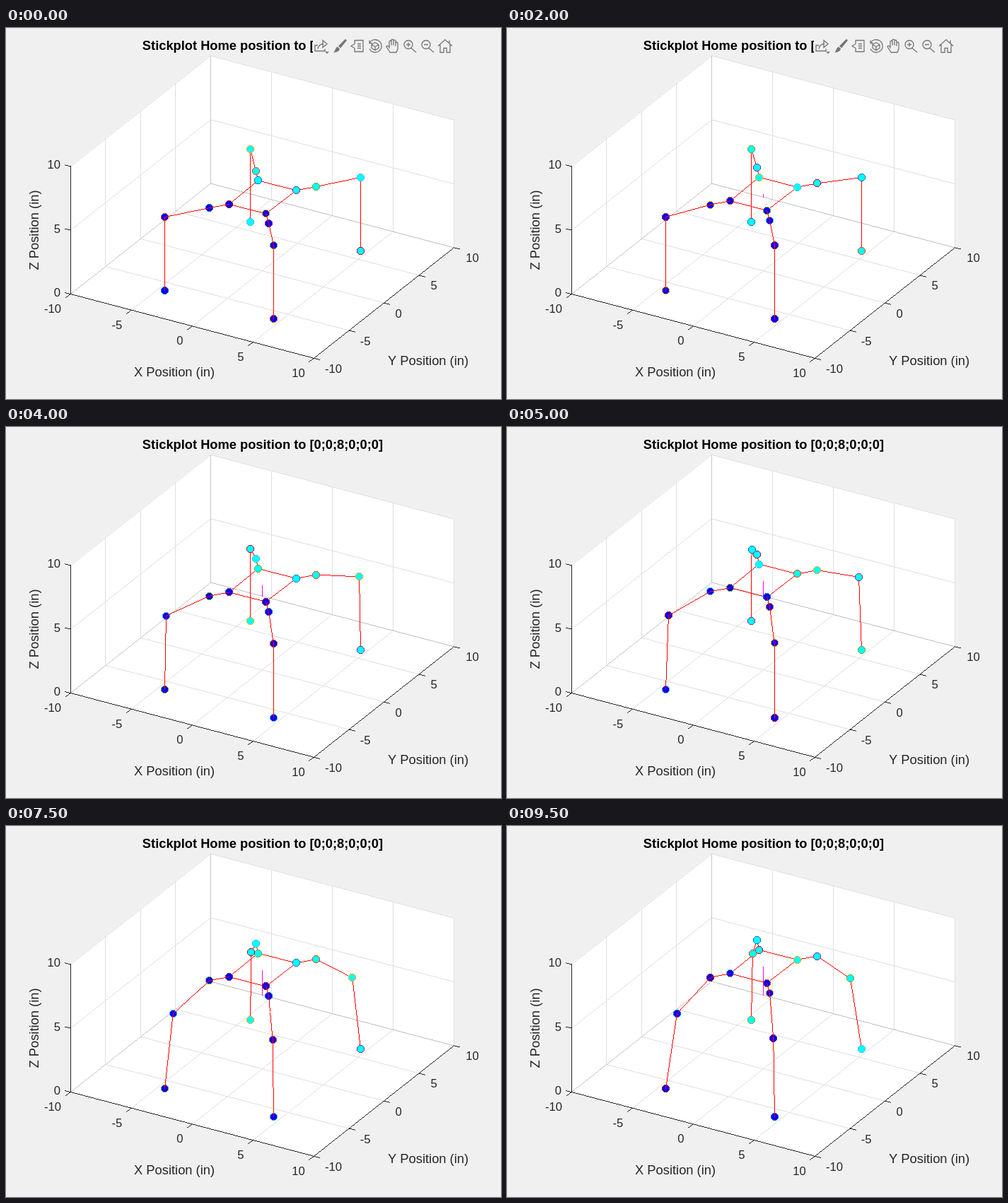
Recreate the animation shown at these times as an HTML page with a canvas. Size 700x525 px, loop 10000 ms.

```html
<!DOCTYPE html>
<html lang="en">
<head>
<meta charset="utf-8">
<title>Stickplot</title>
<style>
html, body { margin: 0; width: 100%; height: 100%; overflow: hidden; background: #f0f0f0; }
canvas { display: block; }
</style>
</head>
<body>
<canvas id="stage" width="700" height="525"></canvas>
<script>
const ctx = document.getElementById('stage').getContext('2d');
const FONT = '"Liberation Sans", Arial, sans-serif';
const STEP = 500, STEPS = 20;
const EDGES = ['#0072bd', '#d95319', '#edb120', '#7e2f8e', '#77ac30', '#4dbeee', '#a2142f'];

// Axes projection: pixels per inch along x, y and z
const project = (x, y, z) => [
  91 + (x + 10) * 17.22 + (y + 10) * 9.89,
  376 + (x + 10) * 4.54 - (y + 10) * 7.82 - z * 18.07
];

// Hard-edged one pixel line
function line([x, y], [x2, y2], color) {
  const n = Math.max(1, Math.round(Math.max(Math.abs(x2 - x), Math.abs(y2 - y))));
  const dx = (x2 - x) / n, dy = (y2 - y) / n;
  ctx.fillStyle = color;
  for (let i = 0; i <= n; i++) {
    ctx.fillRect(Math.round(x + dx * i), Math.round(y + dy * i), 1, 1);
  }
}

// Hard-edged disc, 11 pixels wide with a one pixel rim
function marker(x, y, fill, edge) {
  for (let j = -5; j <= 5; j++) {
    for (let i = -5; i <= 5; i++) {
      const d = Math.hypot(i, j);
      if (d >= 5.4) continue;
      ctx.fillStyle = d > 4.5 ? edge : fill;
      ctx.fillRect(x + i, y + j, 1, 1);
    }
  }
}

function text(s, x, y, size = 16.67, align = 'left', color = '#262626', weight = '') {
  ctx.font = `${weight} ${size}px ${FONT}`;
  ctx.textAlign = align;
  ctx.fillStyle = color;
  ctx.fillText(s, x, y);
}

function drawAxes() {
  ctx.fillStyle = '#f0f0f0';
  ctx.fillRect(0, 0, 700, 525);
  const outline = [[-10, -10, 10], [-10, 10, 10], [10, 10, 10], [10, 10, 0], [10, -10, 0], [-10, -10, 0]];
  ctx.fillStyle = '#fff';
  ctx.beginPath();
  outline.forEach(p => ctx.lineTo(...project(...p)));
  ctx.fill();

  const grid = (a, b, color = '#dfdfdf') => line(project(...a), project(...b), color);
  for (let v = -10; v <= 10; v += 5) {
    grid([v, -10, 0], [v, 10, 0]);
    grid([v, 10, 0], [v, 10, 10]);
    grid([-10, v, 0], [10, v, 0]);
    grid([-10, v, 0], [-10, v, 10]);
  }
  for (let z = 5; z <= 10; z += 5) {
    grid([-10, -10, z], [-10, 10, z]);
    grid([-10, 10, z], [10, 10, z]);
  }
  grid([-10, 10, 0], [-10, 10, 10], '#c6c6c6');
  grid([-10, 10, 0], [10, 10, 0], '#c0c0c0');
  grid([-10, -10, 0], [-10, 10, 0], '#c6c6c6');

  const ink = '#262626';
  grid([-10, -10, 0], [-10, -10, 10], ink);
  grid([-10, -10, 0], [10, -10, 0], ink);
  grid([10, -10, 0], [10, 10, 0], ink);

  const tick = (p, dx, dy) => {
    const [x, y] = project(...p);
    line([x, y], [x + dx, y + dy], ink);
  };
  for (let i = 0; i < 5; i++) {
    const v = i * 5 - 10;
    tick([v, -10, 0], -7, 5);
    tick([10, v, 0], 8, 2);
    text(v, 78 + i * 86.2, 403 + i * 22.7, 16.67, 'right');
    text(v, 451 + i * 49.8, 488 - i * 39.2);
  }
  for (let z = 0; z <= 10; z += 5) {
    tick([-10, -10, z], -8, -2);
    text(z, 77, 380 - z * 18.07, 16.67, 'right');
  }

  text('X Position (in)', 181, 493, 18.33);
  text('Y Position (in)', 540, 477, 18.33);
  ctx.save();
  ctx.translate(46, 286);
  ctx.rotate(-Math.PI / 2);
  text('Z Position (in)', 0, 0, 18.33, 'center');
  ctx.restore();
  text('Stickplot Home position to [0;0;8;0;0;0]', 363, 31, 18.3, 'center', '#000', 'bold');
}

// Toolbar icons, each drawn around its own centre
const ICONS = [
  [446, 'M-5 -1H-9V7H5V4M-5 4C-4 -1 -1 -3 3 -3M2 -8L8 -3L2 2Z', 'M5 8H11L8 11Z'],
  [472, '', 'M8 -10L10 -8L1 3L-2 0ZM-3 1L0 4C-1 8 -5 9 -9 9C-6 7 -7 3 -3 1Z'],
  [497, 'M-4 -8H8V8H-4V3L-9 0L-4 -3ZM0 -3H5M0 0H5M0 3H5', ''],
  [522, 'M-8 -4A9 9 0 1 1 -8 4M-8 -8V-4H-4M0 -5L5 -2V3L0 6L-5 3V-2ZM-5 -2L0 1L5 -2M0 1V6', ''],
  [547, 'M-4 9L-9 1C-9 -1 -7 -1 -5 2V-6C-5 -8 -2 -8 -2 -6V-1V-8C-2 -10 1 -10 1 -8V-1V-7C1 -9 4 -9 4 -7V0V-4C4 -6 7 -6 7 -4V4L5 9Z', ''],
  [571, 'M4 -2A6 6 0 1 1 -8 -2A6 6 0 1 1 4 -2M2 3L9 9M-5 -2H1M-2 -5V1', ''],
  [596, 'M4 -2A6 6 0 1 1 -8 -2A6 6 0 1 1 4 -2M2 3L9 9M-5 -2H1', ''],
  [621, 'M-10 0L0 -9L10 0M-7 -2V9H-2V3H2V9H7V-2M6 -4V-8', '']
];

function drawToolbar() {
  ctx.fillStyle = '#f0f0f0';
  ctx.fillRect(434, 12, 200, 26);
  ctx.strokeStyle = ctx.fillStyle = '#757575';
  ctx.lineWidth = 1.3;
  for (const [x, stroke, fill] of ICONS) {
    ctx.save();
    ctx.translate(x, 25.5);
    ctx.stroke(new Path2D(stroke));
    ctx.fill(new Path2D(fill));
    ctx.restore();
  }
}

// Resting joints, outward direction on x/y, and first edge colour of each leg
const LEGS = [
  { body: [356, 215.4], hip: [353, 201.9], knee: [345.1, 171], foot: [345, 274], out: [-1, 1], edge: 0, tip: 5, far: true },
  { body: [410, 229.3], hip: [438, 224], knee: [501, 211], foot: [501, 315], out: [1, 1], edge: 3, tip: 6, far: true },
  { body: [315, 248.9], hip: [287, 254.2], knee: [224, 267], foot: [224, 371], out: [-1, -1], edge: 6, tip: 0 },
  { body: [367, 262.3], hip: [371, 276.2], knee: [378, 307], foot: [378, 411], out: [1, -1], edge: 2, tip: 1 }
];
const FEMUR = 3.46, TIBIA = 5.75, PX = 18.1, RISE = 40.5;

// Two-link solution: how far the knee moves inward and down
function kneeShift(lift) {
  const h = TIBIA + lift / PX;
  const d = Math.hypot(FEMUR, h);
  const cos = (TIBIA ** 2 + d ** 2 - FEMUR ** 2) / (2 * TIBIA * d);
  const tilt = Math.atan2(FEMUR, h) - Math.acos(Math.min(1, cos));
  return [TIBIA * Math.sin(tilt), TIBIA * (1 - Math.cos(tilt))];
}

function pose(leg, lift) {
  const [inward, drop] = kneeShift(lift);
  const a = -leg.out[0] * inward * 0.584, b = -leg.out[1] * inward * 0.812;
  const up = ([x, y]) => [x, y - lift];
  return [
    up(leg.body),
    up(leg.hip),
    [leg.knee[0] + a * 17.25 + b * 9.9, leg.knee[1] + a * 4.55 - b * 7.85 + drop * PX],
    leg.foot
  ];
}

function drawLinks(pts) {
  for (let i = 0; i < 3; i++) line(pts[i], pts[i + 1], '#f00');
}

function drawJoints(leg, pts, step) {
  pts.forEach(([x, y], i) => {
    const first = i === 3 ? leg.tip : leg.edge + i;
    marker(Math.round(x), Math.round(y), leg.far ? '#0ff' : '#00f', EDGES[(first + step * 4) % 7]);
  });
}

function draw(step) {
  const s = step / (STEPS - 1);
  const lift = RISE * s * s * (3 - 2 * s);
  drawAxes();
  if (step < 8) drawToolbar();
  if (step) line([362, 239], [362, 239.5 - lift], '#f0f');

  const pts = LEGS.map(leg => pose(leg, lift));
  const [fl, fr, nl, nr] = pts;
  drawLinks(fl);
  drawLinks(fr);
  const loop = [fl, fr, nr, nl, fl];
  for (let i = 0; i < 4; i++) line(loop[i][0], loop[i + 1][0], '#f00');
  LEGS.forEach((leg, i) => drawJoints(leg, pts[i], step));
  drawLinks(nl);
  drawLinks(nr);
}

let shown = -1;
const start = performance.now();
function tickFrame() {
  const step = Math.floor((performance.now() - start) / STEP) % STEPS;
  if (step !== shown) draw(shown = step);
  requestAnimationFrame(tickFrame);
}
tickFrame();
</script>
</body>
</html>
```
